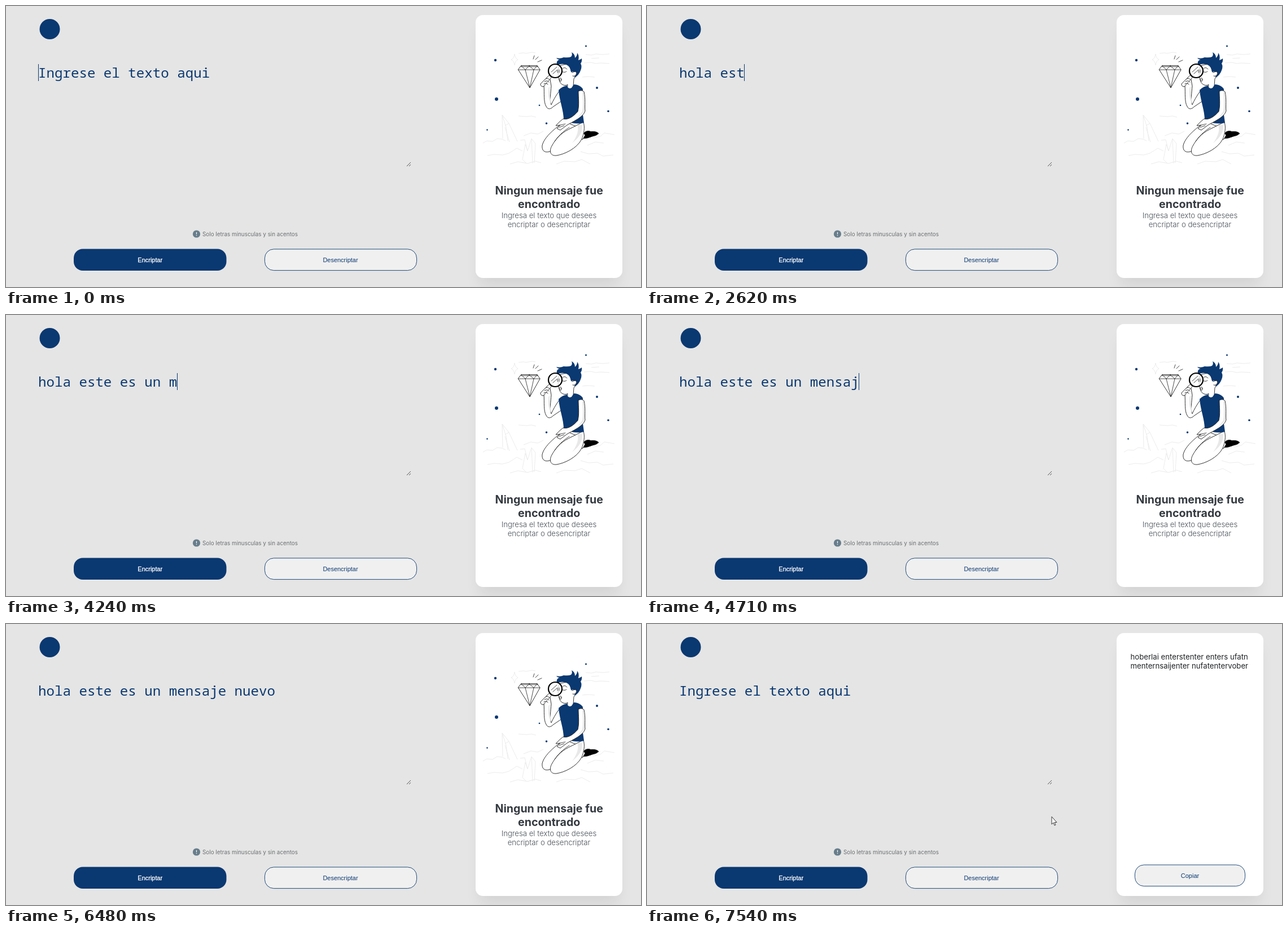
Recreate the animation shown at these times as an HTML page. Size 1125 by 498 pixels, loop 8 s.

```html
<!DOCTYPE html>
<html lang="es">
<head>
<meta charset="utf-8">
<style>
  html, body { margin: 0; width: 100%; height: 100%; overflow: hidden; background: #e5e5e5; }
  .card {
    position: absolute; left: 832px; top: 16px; width: 260px; height: 466px;
    border-radius: 13px; background: #fff; box-shadow: 0 20px 26px -6.6px rgba(0, 0, 0, .08);
  }
  svg { position: absolute; left: 0; top: 0; }
  text { font-family: Inter, sans-serif; white-space: pre; }
  #typed { font: 24.15px "Noto Sans Mono", monospace; fill: #0a3871; }
  .title { font-size: 19.6px; font-weight: 700; fill: #343a40; }
  .body { font-size: 13.18px; font-weight: 300; fill: #495057; }
  .output { font-size: 13.18px; fill: #1f2225; }
  .button { font: 10.98px "Liberation Sans", Arial, sans-serif; fill: #0a3871; }
  .primary { fill: #fff; stroke: #fff; stroke-width: .3; }
  .mid { text-anchor: middle; }
  .navy { fill: #0a3871; }
  .outlined { fill: #f0f0f0; stroke: #0a3871; stroke-width: .9; }
  .ink { fill: #fff; stroke: #1c1c1c; stroke-width: .9; stroke-linejoin: round; stroke-linecap: round; }
  .ink .line { fill: none; stroke-width: .8; }
  .ink .shade { fill: #e8e8e8; stroke: none; }
  .ink .navy { stroke: none; }
  .faint { fill: none; stroke: #ececec; stroke-linejoin: round; }
</style>
</head>
<body>
<div class="card"></div>
<svg width="1125" height="498" viewBox="0 0 1125 498">
  <circle class="navy" cx="77.5" cy="41" r="18"/>

  <text id="typed" x="57" y="127"></text>
  <rect id="caret" class="navy" y="103" width="1" height="30"/>
  <path d="M710 284l7-7M714 284l3-3" stroke="#555"/>

  <circle cx="337.5" cy="404" r="6.6" fill="#677d8b"/>
  <path d="M337.5 400.8v3.8M337.5 406v1.2" stroke="#fff" stroke-width="1.2"/>
  <text x="348" y="407.5" font-size="9.88" fill="#6b6e71">Solo letras minusculas y sin acentos</text>

  <rect class="navy" x="120" y="430.5" width="270.5" height="38.5" rx="16"/>
  <text class="button primary mid" x="255.3" y="453.5">Encriptar</text>
  <rect class="outlined" x="458.4" y="430.9" width="269.2" height="37.7" rx="16"/>
  <text class="button mid" x="592.5" y="453.5">Desencriptar</text>

  <g id="empty">
    <g class="faint">
      <path d="M901 85q1 8 6 10q-5 2-6 10q-1-8-6-10q5-2 6-10z"/>
      <path d="M908 84l9-1 4 1 11-2 6 1M1027 86l10 1 8-2 12 1 12-1M1024 101l12-1 9 2 8-1 16 1M1037 93l14-1"/>
      <path d="M908 195l14 1 9-1 8 2M1021 126l10-1 12 1"/>
      <path d="M845 243l7-4 10 1 8-5 9 1 6 3M880 235l-1-42 12 15 15 32M879 193l7 22 3 24M884 212l7-4M892 241l-8-26"/>
      <path d="M911 238l8-1 5 20 7-22 7 9-2 34M924 257l-4-12-5 27 7 7M931 235l2 44M917 230l13-5 12 2 10-5"/>
      <path d="M853 265l12-2 15 1 11-3 14-9 10 5M893 280l14-4 17 3 14-4 10 3M1018 258l14 4 16-1 10 5 18-2M975 280l14-5 19 1 12-4 15 8M1040 234l13-3 7-6 18 3M1030 247l14-6 15 2"/>
    </g>

    <g class="navy" id="dots"></g>

    <g class="ink">
      <path d="M913 105.500H941L946 113 928 145 907.500 113z"/>
      <path class="line" d="M907.500 113H946M912 107.500H942M913 106l7 7 8 32 7-32 6-7M920 113l7-7 8 7"/>
      <path class="line" d="M934 94l2-6M938 95l5-5M942 99l7-3"/>

      <!-- shoe and legs -->
      <path d="M1019 232C1024 222 1030 220 1036 222.500Q1046 221.500 1050 226Q1046 230 1039 231Q1030 235 1021 235z" fill="#000"/>
      <path d="M989 205C974 216 954 231 950 247C949 255 953 261 963 258C977 253 1001 240 1022 236L1026 229 1016 216z"/>
      <path d="M1023 206C1026 215 1024 226 1020 236C1011 253 989 263 975 265C964 266 962 257 967 248C973 237 982 226 996 219z"/>
      <path class="shade" d="M1021 211C1022 223 1016 233 1003 243C1013 229 1015 219 1012 211z"/>
      <path class="line" d="M972 240Q981 226 998 215"/>

      <!-- raised arm -->
      <path d="M980 151C974 159 969 168 966 175C963 167 965 154 966 142L964 130 955 132 953 141C954 154 952 170 957 178C960 184 965 183 970 178L985 168z"/>
      <path class="shade" d="M967 174C961 169 960 156 961 145L964 142C963 154 964 164 967 174z"/>

      <!-- head -->
      <path d="M980 106C977 116 978 127 981 134C984 141 992 142 995 139L994 149Q1000 152 1005 142L1006 129 1014 119 1005 101z"/>
      <path class="navy" d="M977 105C974 101 976 96 981 95Q977 95 975 92Q982 94 988 91Q997 92 1001 90Q1004 87 1002 82Q1008 85 1008 92Q1012 89 1012 83Q1016 88 1014 96Q1018 95 1020 93Q1021 98 1018 102Q1021 107 1018 114Q1015 123 1007 127Q1009 118 1004 116Q1001 120 1000 113Q998 104 988 103Q982 102 977 105z"/>
      <path d="M1003 118Q1010 114 1011 119Q1009 126 1004 124"/>
      <path class="line" d="M986 111q4-4 8 1M985 116q4 3 8 0"/>
      <ellipse cx="982.5" cy="130.5" rx="1.6" ry="3"/>

      <!-- shirt -->
      <path class="navy" d="M979 149Q986 142 994 141Q996 148 1002 145L1006 139Q1016 139 1022 147L1020 178 1024 207Q1004 211 988 202C988 185 981 170 979 149z"/>

      <!-- resting arm -->
      <path d="M1014 151Q1020 148 1024 152C1027 164 1025 178 1026 186C1023 197 1004 205 994 211L982 220 976 217 982 211 974 212 982 204 987 200C997 203 1008 193 1013 187C1016 175 1014 163 1014 151z"/>
      <path class="shade" d="M1021 152Q1023 173 1021 187L1013 197Q1024 190 1025 184L1024 154z"/>
      <path class="line" d="M982 211l9-2M980 215l9-3"/>

      <!-- magnifier -->
      <path d="M962 123L947 138Q947 143 952 143L966 127z"/>
      <circle cx="973" cy="115" r="12" fill-opacity=".75" style="stroke:#000;stroke-width:2.2"/>
      <path class="line" d="M966 117l10-9M969 120l8-7M977 114v4M980 113v5"/>
      <path d="M955 130q4-4 7 0M954 134q5-3 8 1M953 138q5-2 7 1"/>
    </g>

    <g class="mid">
      <text class="title" x="962.2" y="334">Ningun mensaje fue</text>
      <text class="title" x="962.2" y="358">encontrado</text>
      <text class="body" x="962" y="376">Ingresa el texto que desees</text>
      <text class="body" x="962" y="392">encriptar o desencriptar</text>
    </g>
  </g>

  <g id="result">
    <text class="output" x="856.5" y="63">hoberlai enterstenter enters ufatn</text>
    <text class="output" x="856.5" y="79">menternsaijenter nufatentervober</text>
    <rect class="outlined" x="864.4" y="426.9" width="195.2" height="37.7" rx="16"/>
    <text class="button mid" x="962" y="449.5">Copiar</text>
  </g>

  <path id="hand" fill="#fff" stroke="#222" stroke-width=".6" d="M4 12V2Q5.500-.5 7 2V8Q9 6.500 10 8.500Q12 7.500 12.500 9.500Q14.500 9 14.500 11V15L12.500 18V20.500H5.500V18.500L.5 12.500Q1 9.500 4 12z"/>
  <path id="arrow" fill="#fff" stroke="#222" stroke-width=".9" d="M717 341.500V355L720 352 722 357 724 356 722 351.500H726z"/>
</svg>
<script>
const LOOP = 8000, CHAR = 14.49, CLICK = 7150, DONE = 7220;
const message = 'hola este es un mensaje nuevo';
const keyTimes = [690, 750, 900, 990, 1140, 1230, 1390, 1630, 2690, 3270, 3340, 3510, 3580, 3830, 3830,
  4000, 4240, 4320, 4400, 4550, 4630, 4710, 4880, 5370, 5690, 5770, 5850, 5930, 5990];
const caretHidden = [[420, 690], [2120, 2620], [6480, 6980], [CLICK, LOOP]];
const dots = [[867, 96, 2.2], [1027.5, 71, 1.5], [869, 165, 3], [1047, 145, 2],
  [1067, 186.5, 1.8], [945, 176, 1.3], [957.5, 208, 1.8], [852.5, 219.5, 1.3]];

const $ = id => document.getElementById(id);
const show = (id, on) => $(id).setAttribute('visibility', on ? 'visible' : 'hidden');

$('dots').innerHTML = dots.map(([x, y, r]) => `<circle cx="${x}" cy="${y}" r="${r}"/>`).join('');

function draw(t) {
  const count = t < DONE ? keyTimes.filter(k => k <= t).length : 0;
  $('typed').textContent = count ? message.slice(0, count) : 'Ingrese el texto aqui';
  $('caret').setAttribute('x', Math.round(56.5 + count * CHAR));
  show('caret', !caretHidden.some(([from, to]) => t >= from && t < to));
  show('empty', t < DONE);
  show('result', t >= DONE);
  show('hand', t >= 6980 && t < 7540);
  $('hand').setAttribute('transform', `translate(250 ${t < CLICK ? 436 : 442})`);
  show('arrow', t >= 7540);
}

const start = performance.now();
function tick() {
  draw((performance.now() - start) % LOOP);
  requestAnimationFrame(tick);
}
tick();
</script>
</body>
</html>
```
